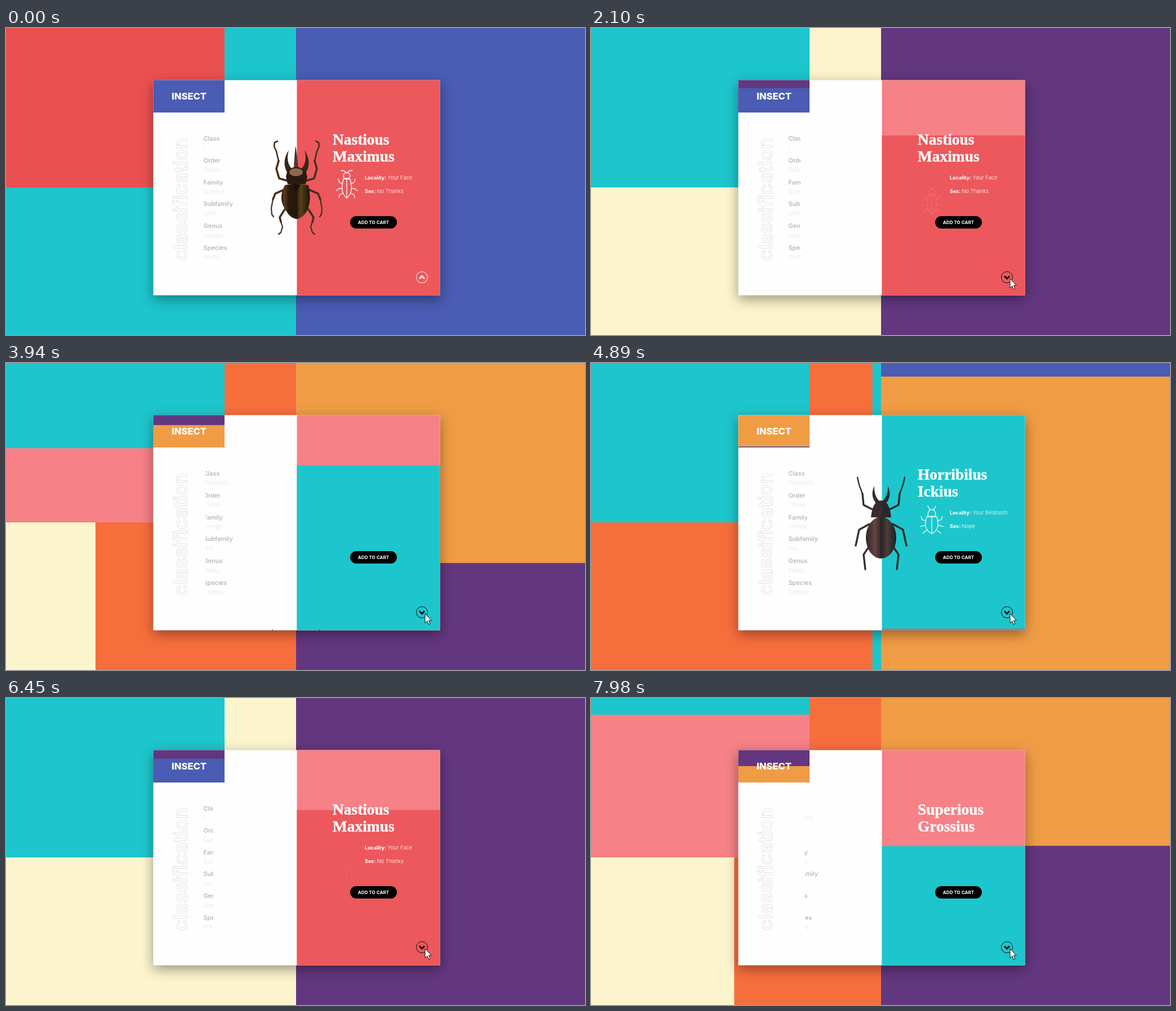
An HTML page for the animation above (8000 ms loop, 1028 by 545 pixels).

```html
<!DOCTYPE html>
<html lang="en">
<head>
<meta charset="utf-8">
<title>Insect shop</title>
<style>
html, body { margin: 0; width: 100%; height: 100%; overflow: hidden; }
svg { display: block; width: 1028px; height: 545px; font-family: Inter, "Open Sans", sans-serif; }
.shadow { filter: drop-shadow(0 7px 11px rgba(0,0,0,.38)); }
.brand { font-size: 16.6px; font-weight: 800; fill: #fff; }
.side { font-size: 34px; font-weight: 600; fill: none; stroke: #d9d7d8; stroke-width: .7; }
.head { font-size: 11px; font-weight: 500; fill: #b8adaf; }
.sub { font-size: 10.5px; font-weight: 300; fill: #e6e3e4; }
.title { font: bold 27.4px "Liberation Serif", serif; fill: #fff; stroke: #fff; stroke-width: .4; }
.key { font-size: 9px; font-weight: 700; fill: #fff; }
.val { font-size: 9.4px; font-weight: 300; fill: #fff; }
.btn { font-size: 8.1px; font-weight: 700; fill: #fff; }
.line { fill: none; stroke: #fff; stroke-width: 1.3; stroke-linecap: round; stroke-linejoin: round; }
.leg { fill: none; stroke-linecap: round; stroke-linejoin: round; }
</style>
</head>
<body>
<svg viewBox="0 0 1028 545">
  <defs>
    <clipPath id="card"><rect x="261.5" y="92.5" width="509" height="382"/></clipPath>
    <clipPath id="listOut"><rect x="340" y="180" height="240"/></clipPath>
    <clipPath id="listIn"><rect y="180" width="100" height="240"/></clipPath>
    <clipPath id="infoOut"><rect x="516" y="93" width="254"/></clipPath>
    <clipPath id="titleIn"><rect x="516" width="254" height="200"/></clipPath>
    <linearGradient id="shell">
      <stop offset="0" stop-color="#1f130b"/><stop offset=".1" stop-color="#5a3d22"/>
      <stop offset=".25" stop-color="#2e1a0c"/><stop offset=".5" stop-color="#241608"/>
      <stop offset=".68" stop-color="#58421a"/><stop offset=".85" stop-color="#3a280f"/>
      <stop offset="1" stop-color="#1b110a"/>
    </linearGradient>
    <linearGradient id="jewel">
      <stop offset="0" stop-color="#12300c"/><stop offset=".28" stop-color="#3f9c18"/>
      <stop offset=".5" stop-color="#1c660e"/><stop offset=".66" stop-color="#46b414"/>
      <stop offset="1" stop-color="#12380d"/>
    </linearGradient>
    <linearGradient id="collar">
      <stop offset="0" stop-color="#24300f"/><stop offset=".25" stop-color="#6e5a14"/>
      <stop offset=".5" stop-color="#3c7a16"/><stop offset=".75" stop-color="#666014"/>
      <stop offset="1" stop-color="#222a0f"/>
    </linearGradient>
    <linearGradient id="night">
      <stop offset="0" stop-color="#1c1418"/><stop offset=".3" stop-color="#5b3430"/>
      <stop offset=".5" stop-color="#21161a"/><stop offset=".7" stop-color="#53302c"/>
      <stop offset="1" stop-color="#1a1216"/>
    </linearGradient>
  </defs>
  <g id="back"></g>
  <g class="shadow"><rect x="261.5" y="92.5" width="509" height="382" fill="#fefefe"/></g>
  <g id="front"></g>
  <text class="brand" x="294" y="127">INSECT</text>
  <text class="side" transform="translate(321.5 413) rotate(-90)">classification</text>
  <g id="texts"></g>
  <rect x="611" y="334" width="83" height="22" rx="11"/>
  <text class="btn" x="652.5" y="347.5" text-anchor="middle">ADD TO CART</text>
  <g id="bugs" clip-path="url(#card)"></g>
  <g id="arrow" fill="none">
    <circle cx="738.5" cy="442.5" r="10" stroke-width="1"/>
    <path id="chevron" stroke-width="3"/>
  </g>
  <circle id="flash" cx="743.5" cy="444.5" r="11.5" fill="#fbbf35" opacity=".8"/>
  <path id="cursor" d="M0 0V16.5L3.8 13L6.5 19L9 17.8L6.4 12H11.4Z" fill="#fff" stroke="#111"/>
</svg>
<script>
const NS = 'http://www.w3.org/2000/svg';
const $ = id => document.getElementById(id);
const set = (el, attrs) => { for (const k in attrs) el.setAttribute(k, attrs[k]); return el; };
const add = (parent, tag, attrs = {}) => parent.appendChild(set(document.createElementNS(NS, tag), attrs));
const ramp = (t, a, b) => Math.min(1, Math.max(0, (t - a) / (b - a)));
const group = (parent, html) => { const g = add(parent, 'g'); g.innerHTML = html; return g; };
const label = (cls, x, y, s) => `<text class="${cls}" x="${x}" y="${y}">${s}</text>`;
const mirror = (cx, html) => html + `<g transform="translate(${2 * cx} 0) scale(-1 1)">${html}</g>`;
const legs = (color, ...paths) => paths.map(([w, d]) =>
  `<path class="leg" stroke="${color}" stroke-width="${w}" d="${d}"/>`).join('');
const lines = d => `<path class="line" d="${d}"/>`;

const HEADS = ['Class', 'Order', 'Family', 'Subfamily', 'Genus', 'Species'];

const stag = mirror(516, legs('#46301f',
    [3.6, 'M499 271L485 267L480 250L484 236'], [2.6, 'M484 236L480 219L476 210L477 203L482 201'],
    [3.6, 'M494 287L478 294L474 304'], [2.2, 'M474 304L471 320L472 331L475 335'],
    [3.6, 'M495 322L486 336L488 344'], [2.2, 'M488 344L491 353L488 363L484 366']) +
  '<path d="M500 258Q488 238 502 217Q496 238 508 251Z" fill="#3a2618"/>') +
  '<path d="M511 250Q512 224 514 209Q517 224 519 250Z" fill="#503728"/>' +
  '<path d="M497 264Q499 247 515 247Q532 247 535 264L532 277H500Z" fill="#2c1a11"/>' +
  '<ellipse cx="515" cy="256" rx="12" ry="7" fill="#8a6852"/>' +
  '<path d="M495 279Q516 274 537 279Q543 304 535 324Q527 338 516 339Q505 338 497 324Q482 304 495 279Z" fill="url(#shell)"/>' +
  '<path d="M510 278H523L516 290Z" fill="#1b100a"/><path d="M516 288V338" stroke="#150c06"/>';

const jewel = legs('#33242c',
    [4.4, 'M501 244L481 239L475 229'], [3, 'M475 229L468 222'],
    [4.4, 'M537 241L556 232L564 233'], [3, 'M564 233L573 221'],
    [4.4, 'M496 258L477 267L464 271'], [3, 'M464 271L451 273'],
    [4.4, 'M542 258L560 264L567 271'], [3, 'M567 271L579 267'],
    [4.2, 'M497 309L482 318L479 333'], [2.8, 'M479 333L477 352L466 360'],
    [4.2, 'M536 309L546 323L541 336'], [2.8, 'M541 336L538 350L542 362'],
    [1.2, 'M512 206Q510 196 498 195'], [1.2, 'M524 207Q537 200 563 203']) +
  '<path d="M506 222L508 207Q519 200 530 207L533 222Z" fill="#34323c"/>' +
  '<path d="M503 222Q519 216 535 222L541 251Q518 256 497 251Z" fill="url(#collar)"/>' +
  '<path d="M494 253H542Q551 284 539 322Q530 350 520 374H514Q502 350 496 326Q485 288 494 253Z" fill="#29182d"/>' +
  '<path d="M498 253H540Q546 284 534 322L518 371L502 326Q491 288 498 253Z" fill="url(#jewel)"/>' +
  '<path d="M518 253V370" stroke="#0e3a0a"/>';

const night = mirror(515, legs('#2a1c1c',
    [3.4, 'M500 258L484 250L482 230'], [2.4, 'M482 230L476 214L473 201'],
    [3.4, 'M494 284L476 294L470 322'], [3.4, 'M496 320L484 338L487 364']) +
  '<path d="M509 250Q494 236 503 216Q502 234 513 244Z" fill="#2a1c1c"/>') +
  '<path d="M497 272Q500 242 515 242Q530 242 533 272Z" fill="#2b1b1c"/>' +
  '<ellipse cx="515" cy="308" rx="27" ry="37" fill="url(#night)"/>' +
  '<path d="M515 272V345" stroke="#120b0d"/>';

const STATES = [
  { tl: '#eb5050', bl: '#1dc6cc', right: '#4a5cb3', panel: '#ec585c', up: true,
    subs: ['I', 'Guess', 'Science', "Ain't", 'Always', 'Pretty'],
    title: ['Nastious', 'Maximus'], facts: ['Your Face', 'No Thanks'], bug: stag,
    icon: lines('M595 253Q602 253 604 257M615 253Q608 253 606 257M599 263Q599 257 605 257Q611 257 611 263L609 267H601ZM599 268H611Q618 292 605 302Q592 292 599 268M605 268V301') +
      mirror(605, lines('M598 277L592 274L590 268M597 285L591 285L586 289M598 293L592 296L591 301')) },
  { tl: '#f68187', bl: '#fcf4cd', right: '#63377f', panel: '#f68187',
    subs: ['Why', 'Would', 'You', 'Even', 'Buy', 'This'],
    title: ['Superious', 'Grossius'], facts: ['Sandwich', 'Hard No'], bug: jewel,
    icon: lines('M597 272Q598 264 605 264Q612 264 613 272ZM594 276H616Q624 295 605 302Q586 295 594 276M605 277L597 299M605 277L613 299') +
      mirror(605, lines('M599 268Q592 260 597 253Q597 261 604 264M592 281L587 279L585 274M590 288L585 288M592 295L587 300')) },
  { tl: '#1dc6cc', bl: '#f76e3d', right: '#f09c45', panel: '#1dc6cc',
    subs: ['Seriously', 'Those', 'Things', 'Are', 'Pretty', 'Creepy'],
    title: ['Horribilus', 'Ickius'], facts: ['Your Bedroom', 'Nope'], bug: night,
    icon: lines('M598 270Q598 258 605 258Q612 258 612 270ZM596 271H614Q621 293 605 301Q589 293 596 271M605 271V301') +
      mirror(605, lines('M602 259L598 252M595 278L588 276L586 270M593 286L585 288M596 295L589 300')) }
];

for (const s of STATES) {
  s.list = group($('texts'), HEADS.map((h, i) => {
    const y = 199.7 + i * 38.9;
    return label('head', 350.5, y, h) + label('sub', 350.5, y + 16.2, s.subs[i]);
  }).join(''));
  s.info = add($('texts'), 'g');
  s.name = group(s.info, s.title.map((w, i) => label('title', 580, 207 + i * 29.5, w)).join(''));
  s.data = group(s.info, label('key', 637, 269, 'Locality:') + label('val', 677.5, 269, s.facts[0]) +
    label('key', 637, 293, 'Sex:') + label('val', 658.5, 293, s.facts[1]));
  s.mark = group($('texts'), s.icon);
  s.insect = group($('bugs'), s.bug);
}

// Each area: box, edge the new colour grows from, delay and length of the wipe
const AREAS = [
  { key: 'bl', box: [0, 0, 515, 545], edge: 'right', at: 12, len: 642 },
  { key: 'tl', box: [0, 0, 388, 283], edge: 'top', at: 308, len: 277 },
  { key: 'right', box: [515, 0, 513, 545], edge: 'top', at: 0, len: 700 },
  { key: 'right', box: [261.5, 92.5, 126.5, 57.5], edge: 'bottom', at: 12, len: 642, front: true },
  { key: 'panel', box: [516.5, 92.5, 254, 382], edge: 'bottom', at: 27, len: 560, front: true }
];
for (const a of AREAS) {
  const g = $(a.front ? 'front' : 'back');
  a.under = add(g, 'rect');
  a.over = add(g, 'rect');
  const [x, y, width, height] = a.box;
  set(a.under, { x, y, width, height });
}

function wipe(a, p) {
  let [x, y, width, height] = a.box;
  if (a.edge === 'right') { x += width * (1 - p); width *= p; }
  else {
    if (a.edge === 'bottom') y += height * (1 - p);
    height *= p;
  }
  set(a.over, { x, y, width, height });
}

function paintArea(a, from, to, t) {
  const p = ramp(t, a.at, a.at + a.len);
  let low = from[a.key], high = to[a.key], size = p;
  if (from === STATES[0]) {
    if (a.front) { low = to[a.key]; high = from[a.key]; size = 1 - p; }
    else if (t < 42) { high = low; size = 1; }
    else if (a.key === 'tl') low = STATES[2].tl;
    else size = 1;
  }
  // a finished wipe leaves one clean colour along half-pixel edges
  a.under.setAttribute('fill', size === 1 ? high : low);
  a.over.setAttribute('fill', high);
  a.over.style.display = size > 0 && size < 1 ? 'inline' : 'none';
  wipe(a, size);
}

const LOOP = 8000;
const TURNS = [[-2000, 2, 0], [1930, 0, 1], [3485, 1, 2], [4860, 2, 0], [6268, 0, 1], [7644, 1, 2]];
const CLICKS = [[1760, 1972], [3400, 3530], [4750, 4890], [6110, 6310], [7510, 7640]];
const PATH = [[260, 948, 535], [540, 456, 274], [940, 456, 274], [1460, 760, 465], [1560, 744, 445]];
const clip = (id, attrs) => set($(id).firstChild, attrs);
const look = (el, opacity, dy = 0, mask = '') => set(el, {
  opacity, transform: `translate(0 ${dy})`, 'clip-path': mask ? `url(#${mask})` : 'none'
});

function paintTexts(from, to, t) {
  const fromFirst = from === STATES[0];
  const gone = ramp(t, 20, 190), come = ramp(t, 560, 740);
  const rise = 275 * (1 - Math.sin(ramp(t, 455, 755) * Math.PI / 2));
  clip('listOut', { width: 63 - 52 * ramp(t, 75, 235) });
  clip('listIn', { x: 403 - 53 * ramp(t, 230, 475) });
  clip('infoOut', { height: fromFirst ? 381 : 381 * (1 - ramp(t, 27, 587)) });
  clip('titleIn', { y: 245 - 65 * ramp(t, 600, 850) });
  for (const s of STATES) {
    const shown = s === from || s === to ? 'inline' : 'none';
    for (const el of [s.list, s.info, s.mark, s.insect]) el.style.display = shown;
  }
  look(from.list, t < 235 ? 1 : 0, 0, 'listOut');
  look(from.info, fromFirst ? 1 - ramp(t, 300, 420) : t < 587 ? 1 : 0, 0, 'infoOut');
  look(from.name, 1);
  look(from.data, 1 - ramp(t, 200, 320));
  look(from.mark, 1 - gone, 32 * gone);
  look(from.insect, 1 - ramp(t, 20, 160), 32 * gone);
  look(to.list, 1, 0, 'listIn');
  look(to.info, 1);
  look(to.name, 1, 0, 'titleIn');
  look(to.data, ramp(t, 600, 760));
  look(to.mark, come, 30 * (1 - come));
  look(to.insect, t > 455 ? 1 : 0, rise);
}

function paintPointer(t) {
  let [, x, y] = PATH[PATH.length - 1];
  for (let i = 1; i < PATH.length; i++) {
    const [t0, x0, y0] = PATH[i - 1], [t1, x1, y1] = PATH[i];
    if (t < t1) {
      const p = ramp(t, t0, t1), e = p * p * (3 - 2 * p);
      x = x0 + (x1 - x0) * e;
      y = y0 + (y1 - y0) * e;
      break;
    }
  }
  set($('cursor'), { transform: `translate(${x} ${y})`, opacity: t < 260 ? 0 : 1 });
  $('arrow').setAttribute('stroke', t > 1440 ? '#0b0712' : '#fff');
  $('flash').style.display = CLICKS.some(([a, b]) => t >= a && t < b) ? 'inline' : 'none';
}

function render(t) {
  const [start, i, j] = TURNS.filter(turn => turn[0] <= t).pop();
  const from = STATES[i], to = STATES[j], dt = t - start;
  for (const a of AREAS) paintArea(a, from, to, dt);
  paintTexts(from, to, dt);
  const up = (dt < 42 ? from : to).up;
  $('chevron').setAttribute('d', up ? 'M734 445L738.5 440.5L743 445' : 'M734 440.5L738.5 445L743 440.5');
  paintPointer(t);
}

const began = performance.now();
function tick() {
  render((performance.now() - began) % LOOP);
  requestAnimationFrame(tick);
}
tick();
</script>
</body>
</html>
```
